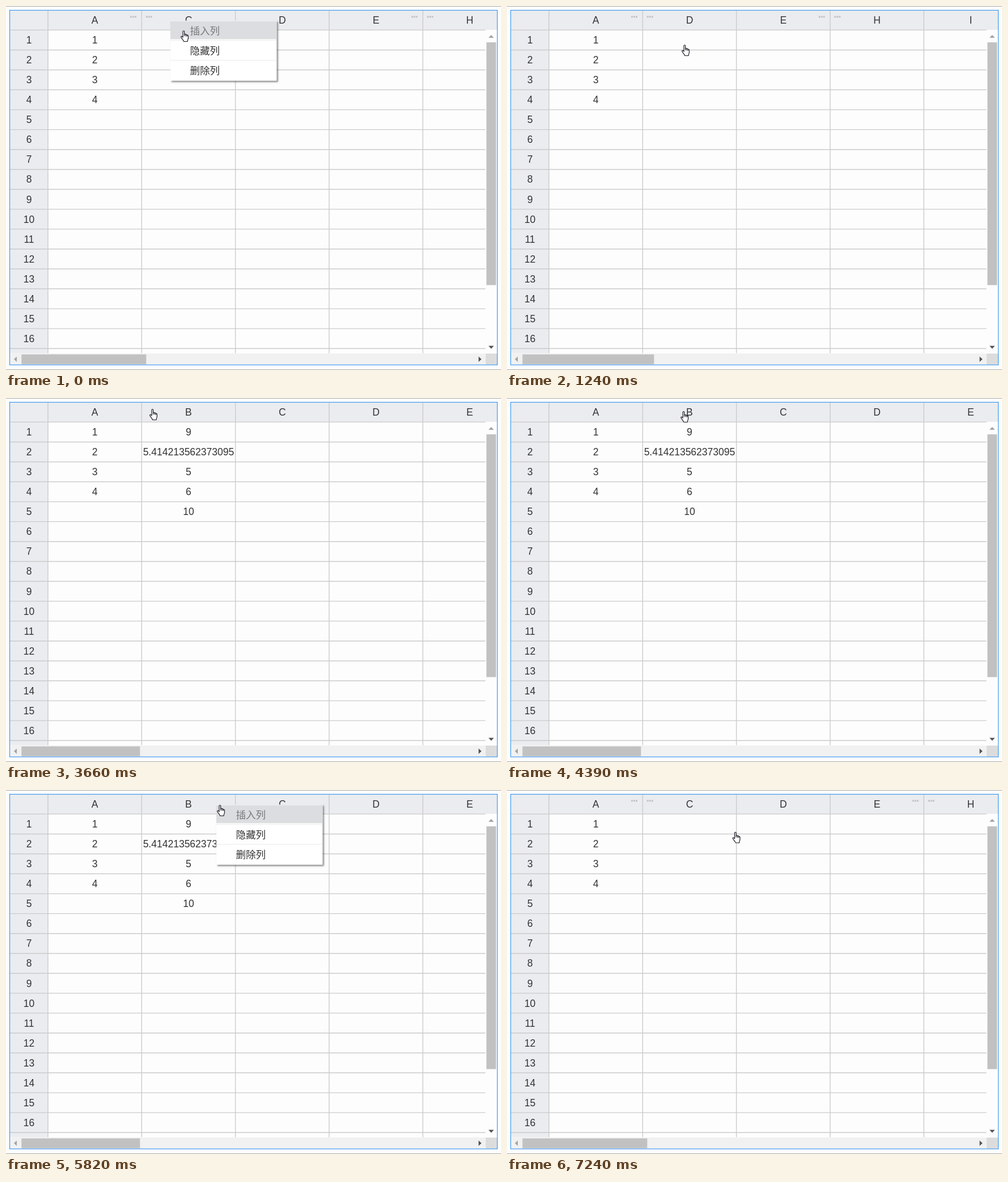
Recreate the animation shown at these times as an HTML page. Size 873 px wide and 641 px high, loop 8 s.

```html
<!DOCTYPE html>
<html lang="zh-CN">
<head>
<meta charset="utf-8">
<title>Spreadsheet columns</title>
<style>
html, body { margin: 0; width: 100%; height: 100%; overflow: hidden; background: #fdfdfd; }
svg { display: block; width: 100%; height: 100%; }
text { font: 17.5px "Liberation Sans", Arial, sans-serif; fill: #333; }
.mid text { text-anchor: middle; }
#menu text { font: 300 17.5px "Noto Sans CJK SC", "Noto Sans CJK", sans-serif; }
#menu .box { filter: drop-shadow(2px 2px 1.5px rgba(0, 0, 0, .5)); }
</style>
</head>
<body>
<svg id="stage" viewBox="0 0 873 641">
  <defs>
    <clipPath id="view"><path d="M7 8H866V42H845.5V611.5H7Z"/></clipPath>
  </defs>
  <rect width="873" height="641" fill="#fdfdfd"/>
  <path d="M0 .5H873M0 640.5H873" stroke="#a9a9a9"/>
  <g clip-path="url(#view)" class="mid">
    <path d="M7 8H866V42.4H74V612H7Z" fill="#eaecf0"/>
    <g id="grid"></g>
    <g id="cells"></g>
    <g id="dots"></g>
  </g>
  <g id="bars">
    <rect x="847.3" y="64" width="17" height="427.5" fill="#c1c1c1"/>
    <path d="M851 56L855.7 51L860.4 56Z" fill="#a3a3a3"/>
    <path d="M851 598.5L855.7 603.5L860.4 598.5Z" fill="#505050"/>
    <rect x="7" y="612" width="839" height="19.5" fill="#f1f1f1"/>
    <rect id="thumb" x="27.3" y="613.5" height="17.3" fill="#c1c1c1"/>
    <path d="M19 617.3L14 622L19 626.7Z" fill="#a3a3a3"/>
    <path d="M833.5 617.3L838.5 622L833.5 626.7Z" fill="#505050"/>
    <rect x="846" y="612" width="20" height="19.5" fill="#dcdcdc"/>
  </g>
  <rect x="6.5" y="7.5" width="860" height="624.5" fill="none" stroke="#409bf0" stroke-width="1.2"/>
  <g id="menu">
    <rect class="box" y="25.7" width="187.5" height="106" fill="#fff"/>
    <path d="M0 60.5H187.5M0 95.5H187.5" stroke="#ebebeb"/>
    <rect id="hover" width="187.5" height="32" fill="#dcdde0"/>
    <text x="34.5" y="49.6">插入列</text>
    <text x="34.5" y="84.6">隐藏列</text>
    <text x="34.5" y="119.6">删除列</text>
  </g>
  <path id="hand" fill="#fff" stroke="#15151f" stroke-width="1.15" stroke-linejoin="round"
    d="M4 12.2V2a1.3 1.3 0 0 1 2.6 0V9.5V7.4a1.15 1.15 0 0 1 2.3 0V10V8.2a1.15 1.15 0 0 1 2.3 0V10.4V9.4a1.1 1.1 0 0 1 2.2 0V13.5C13.4 15.8 12 16.6 12 19.5H5.6C5.3 17.4 1 13.6 .7 11.6C.5 9.9 2.4 9.6 4 12.2Z"/>
</svg>
<script>
const LOOP = 8000;
const LEFT = 74, COL = 165.3, TOP = 42.4, ROW = 35.05;
const $ = id => document.getElementById(id);

// Visible columns, scroll thumb width, left edge of each hidden-column gap
const sheets = {
  full: { cols: 'ABCDE', thumb: 209, gaps: [] },
  noB: { cols: 'ACDEH', thumb: 220, gaps: [1, 4] },
  noBC: { cols: 'ADEHI', thumb: 232, gaps: [1, 3] }
};
const values = { A: [1, 2, 3, 4], B: [9, '5.414213562373095', 5, 6, 10] };

// Scene changes: start, sheet, menu x
const scenes = [
  [0, 'noB', 290], [1240, 'noBC'], [3660, 'full'],
  [5760, 'full', 371], [7240, 'noB']
];

// Pointer moves: first change, last change, steps, end x, end y
const moves = [
  [0, 0, 1, 308, 43],
  [60, 350, 5, 308, 68],
  [1990, 2260, 4, 268, 38],
  [2350, 2470, 3, 260, 31],
  [2650, 2890, 4, 253, 19],
  [4180, 4570, 7, 346, 26],
  [4720, 4870, 3, 368, 26],
  [5820, 5820, 1, 372, 26],
  [6250, 6530, 5, 398, 59],
  [6590, 6650, 2, 397.5, 73.5]
];

const label = (x, y, s) => `<text x="${x}" y="${y + 6.2}">${s}</text>`;
const colMid = i => LEFT + COL * (i + .5);
const rowMid = i => TOP + ROW * (i + .5);

function drawGrid() {
  let d = '', numbers = '';
  for (let i = 0; i < 17; i++) {
    d += `M7 ${TOP + ROW * i}H846`;
    numbers += label(40.5, rowMid(i), i + 1);
  }
  for (let i = 0; i < 5; i++) d += `M${LEFT + COL * i} 8V612`;
  $('grid').innerHTML = `<path d="${d}" stroke="#cbcbcb" stroke-width="1.4"/>${numbers}`;
}

function dotGroup(x, fill) {
  return [0, 4, 8].map(dx =>
    `<rect x="${x + dx}" y="17.4" width="3" height="3" rx=".5" fill="${fill}"/>`).join('');
}

let shown;
function drawSheet(name) {
  if (name === shown) return;
  shown = name;
  const { cols, thumb } = sheets[name];
  $('cells').innerHTML = [...cols].map((c, i) =>
    label(colMid(i), 25, c) +
    (values[c] || []).map((v, r) => label(colMid(i), rowMid(r), v)).join('')
  ).join('');
  $('thumb').setAttribute('width', thumb);
}

function pointerAt(t) {
  let x = 0, y = 0;
  for (const [start, end, steps, toX, toY] of moves) {
    if (t < start) break;
    const done = end > start ? Math.floor((t - start) / (end - start) * (steps - 1) + 1e-6) : 0;
    const p = t >= end ? 1 : (done + 1) / steps;
    x += (toX - x) * p;
    y += (toY - y) * p;
  }
  return [x, y];
}

function render(t) {
  const [, sheet, menuX] = scenes.filter(s => s[0] <= t).pop();
  const [x, y] = pointerAt(t);
  drawSheet(sheet);

  const overDots = x < 256 && y < 22;
  $('dots').innerHTML = sheets[sheet].gaps.map(i => {
    const edge = LEFT + COL * i;
    return dotGroup(edge - 20.3, '#c2c3c6') +
      dotGroup(edge + 7.4, overDots && i === 1 ? '#909296' : '#c2c3c6');
  }).join('');

  $('menu').style.display = menuX ? '' : 'none';
  if (menuX) {
    const row = y > 61 ? 1 : 0;
    $('menu').setAttribute('transform', `translate(${menuX} 0)`);
    $('hover').setAttribute('y', row ? 62 : 26.5);
    $('menu').querySelectorAll('text').forEach((el, i) => {
      el.style.fill = i === row ? '#77787a' : '#333';
    });
  }
  $('hand').setAttribute('transform', `translate(${x} ${y})`);
}

drawGrid();
const begin = performance.now();
function tick() {
  render((performance.now() - begin) % LOOP);
  requestAnimationFrame(tick);
}
tick();
</script>
</body>
</html>
```
